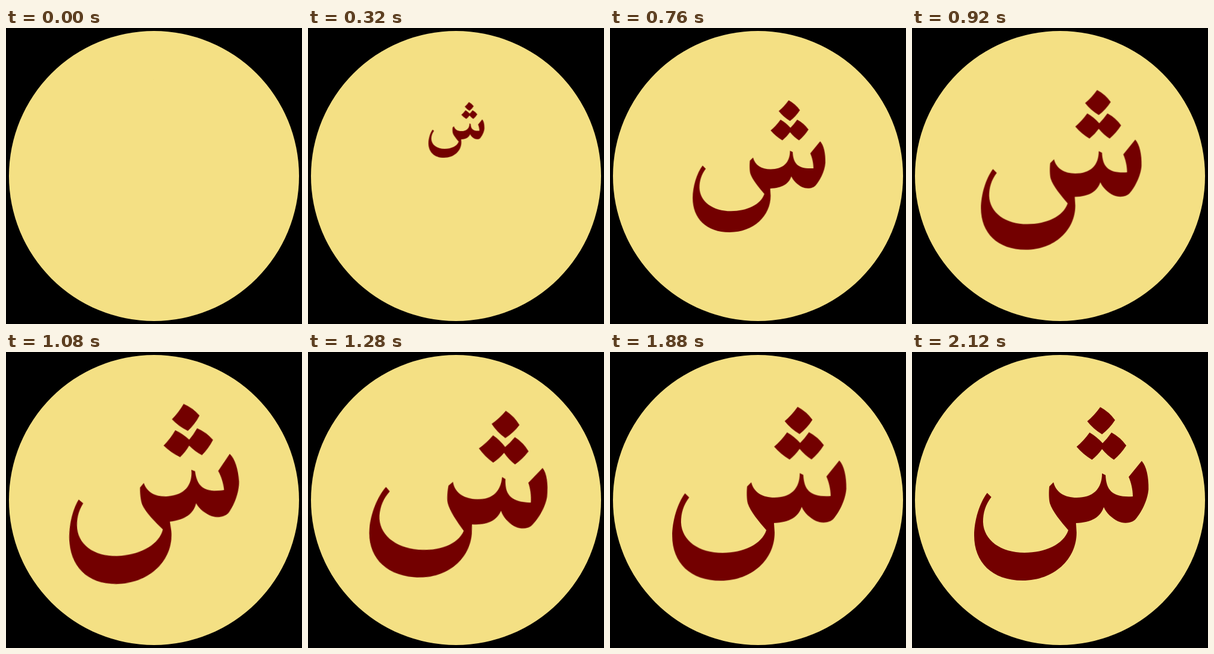
An HTML page that plays this animation: 500x500 px, repeating every 2.8 s.

```html
<!DOCTYPE html>
<html lang="ar">
<head>
<meta charset="utf-8">
<title>ش</title>
<style>
  html, body { margin: 0; width: 100%; height: 100%; overflow: hidden; background: #000; }
  svg { display: block; width: 100%; height: 100%; }

  .drop, .grow, .swing {
    transform-origin: 250px 290px;
    animation: 2800ms linear infinite;
  }
  .drop { animation-name: drop; }
  .grow { animation-name: grow; }
  .swing { animation-name: swing; }

  /* the letter sinks and grows during the first second */
  @keyframes drop {
    0% { transform: translateY(-204px); animation-timing-function: cubic-bezier(.333, .609, .667, .943); }
    35.714%, 100% { transform: translateY(0); }
  }
  @keyframes grow {
    0% { transform: scale(0); }
    35.714%, 100% { transform: scale(1); }
  }
  /* then it rocks, pauses and settles */
  @keyframes swing {
    0%, 35.714% { transform: rotate(0deg); }
    38.571% { transform: rotate(-5.2deg); }
    45.714% { transform: rotate(4.8deg); }
    52.857%, 57.143% { transform: rotate(-.7deg); }
    75.714%, 100% { transform: rotate(0deg); }
  }
</style>
</head>
<body>
<svg viewBox="0 0 500 500" role="img" aria-label="ش">
  <circle cx="250" cy="250" r="245" fill="#f4e084"/>
  <g class="drop"><g class="grow"><g class="swing" fill="#730000">
    <!-- dots -->
    <path d="M318 93Q333 101 343 115Q334 129 321 139Q306 130 296 117Q308 107 318 93Z"/>
    <path d="M300 136Q312 143 322 154Q330 146 337 136Q352 144 362 158Q353 172 341 182Q330 175 321 164Q314 174 304 182Q289 173 278 160Q290 150 300 136Z"/>
    <!-- body -->
    <path d="M388 184C396 193 400 211 399.500 232C398 252 386 273 378 282
      C371 290 357 290 348 286C338 281 328 272 324 262C318 279 304 288 277 289
      L278 305C278 350 240 386 187 386C135 386 105 355 105 310
      C105 285 114 255 127 238L134 245C124 258 120 272 120 287
      C121 318 150 339 190 339C225 339 256 325 264 301
      C252 287 237 269 233 256C231 249 231 235 232 227L239 220
      C243 237 258 246 278 246C305 246 321 232 321 205L327 208
      C328 235 340 246 373 244C373 232 370 220 366 211Z"/>
  </g></g></g>
</svg>
</body>
</html>
```
